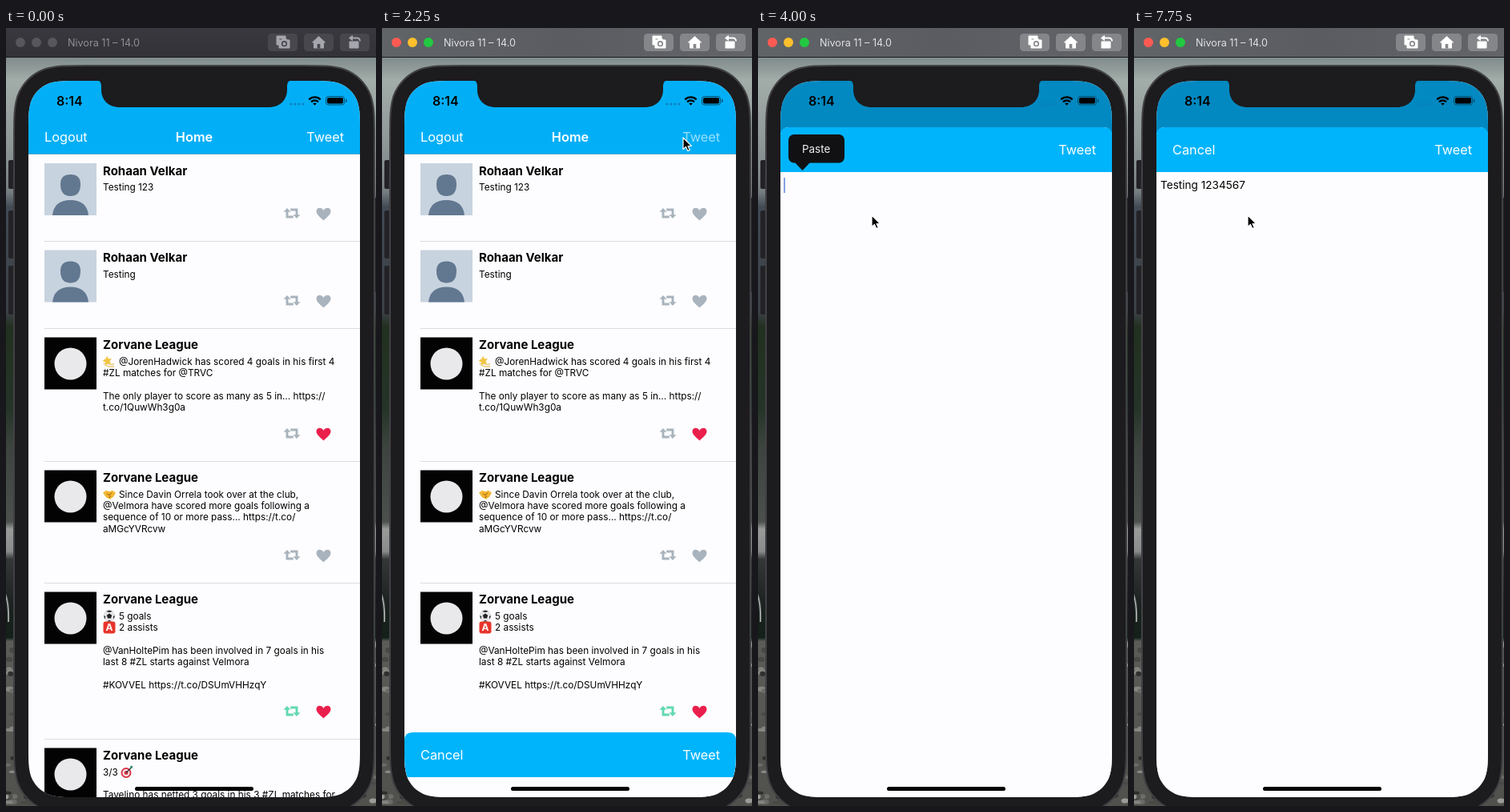
Write an HTML page that moves like this. It is 462 by 972 pixels and loops after 8 s.

```html
<!DOCTYPE html>
<html lang="en">
<head>
<meta charset="utf-8">
<title>Posting from the phone</title>
<style>
html, body { margin: 0; width: 100%; height: 100%; overflow: hidden; background: #1c1b1e; }
svg { display: block; width: 100vw; height: 100vh; font-family: Inter, Roboto, sans-serif; }
.bar { fill: url(#barOff); }
.pill { fill: #48474e; }
.glyph { fill: #a5a5ad; stroke: #a5a5ad; }
.title { fill: #8f8e98; font-size: 12.6px; }
.light { fill: #57565d; }
.on .bar { fill: url(#barOn); }
.on .pill { fill: #85868a; }
.on .glyph { fill: #fff; stroke: #fff; }
.on .title { fill: #dfe0e4; }
.on .red { fill: #ff5a52; }
.on .amber { fill: #ffc02c; }
.on .green { fill: #22c840; }
.hole { fill: #48474e; stroke: none; }
.on .hole { fill: #85868a; }
.nav { font-size: 16.3px; fill: #fff; }
.name { font-size: 15px; font-weight: 700; }
.body { font-size: 11.8px; }
</style>
</head>
<body>
<script>
const LOOP = 8000, STEP = 250;

function seeded(s) {
  return () => (s = (s * 16807) % 2147483647) / 2147483647;
}

const PAPER = '#fdfdff', CASE = '#1c1b1e', IDLE = '#a9b3bd';

const text = (x, y, s, cls, extra = '') => `<text x="${x}" y="${y}" class="${cls}" ${extra}>${s}</text>`;
const box = (x, y, w, h, fill, r = 0) => `<rect x="${x}" y="${y}" width="${w}" height="${h}" rx="${r}" fill="${fill}"/>`;
const dot = (x, y, r, fill) => `<circle cx="${x}" cy="${y}" r="${r}" fill="${fill}"/>`;
const gradient = (id, stops, dir = 'x2="0" y2="1"') => `<linearGradient id="${id}" ${dir}>` +
  stops.map(([o, c]) => `<stop offset="${o}" stop-color="${c}"/>`).join('') + '</linearGradient>';

// rectangle with continuous-curvature corners
function squircle(x, y, w, h, r) {
  const half = [[0, 1.529], [0, 1.089], [0, .868], [.075, .632], [.169, .373]];
  const corner = half.concat(half.slice().reverse().map(([a, b]) => [b, a]));
  const place = (sx, sy, flip) => {
    const p = corner.map(([a, b]) => `${x + (sx ? w - a * r : a * r)} ${y + (sy ? h - b * r : b * r)}`);
    if (flip) p.reverse();
    return `${p[0]}C${p.slice(1).join(' ')}`;
  };
  return `M${place(0, 0)}L${place(1, 0, 1)}L${place(1, 1)}L${place(0, 1, 1)}Z`;
}

// --- desktop behind the phone ---
function stones() {
  const rnd = seeded(41), tones = ['#85857f', '#494a45', '#6b6c68', '#2f302e', '#9a9b98'];
  let s = '';
  for (let i = 0; i < 70; i++) {
    const x = i % 3 ? rnd() * 34 : 440 + rnd() * 22;
    s += `<ellipse cx="${x.toFixed(1)}" cy="${(768 + rnd() * 204).toFixed(1)}" rx="${(3 + rnd() * 4).toFixed(1)}" ry="${(1.5 + rnd() * 2).toFixed(1)}" fill="${tones[i % 5]}"/>`;
  }
  return s;
}

const desktop = box(0, 37, 462, 935, 'url(#wall)') + stones() +
  '<path d="M-4 702Q4 712 3 742" fill="none" stroke="#a0a4a4" stroke-width="2"/>';

const phone =
  [[165, 36], [228, 60], [297, 61]].map(([y, h]) => box(3, y, 8, h, '#232226', 2)).join('') +
  box(458, 212, 4, 118, '#232226') +
  `<path d="${squircle(10, 47, 450, 934, 60)}" fill="${CASE}" stroke="#424145" stroke-width="2"/>`;

// --- window title bar ---
const titleBar = `<rect class="bar" width="462" height="37"/>` + box(0, 36, 462, 1, '#1a1a1c') +
  ['red', 'amber', 'green'].map((c, i) => `<circle class="light ${c}" cx="${18 + 20 * i}" cy="18" r="6"/>`).join('') +
  text(77, 23, 'Nivora 11 – 14.0', 'title') +
  [327, 372, 417].map(x => `<rect class="pill" x="${x}" y="7" width="37" height="22" rx="4.5"/>`).join('') +
  `<g class="glyph" stroke-width="1" stroke-linejoin="round">
    <path d="M338 10h11v3h-8v8h-3z"/><path d="M341 15h3l1.5-2h4l1.5 2h3v10h-13z"/>
    <circle class="hole" cx="347.500" cy="19.700" r="3.600"/><circle cx="347.500" cy="19.700" r="2" stroke="none"/>
    <path d="M382.500 18L390.500 10.500L398.500 18H396.500V25H384.500V18Z"/><rect class="hole" x="388.700" y="20" width="3.600" height="5.500"/>
    <path d="M429 17h11v8h-11z"/><path d="M432 12.500h6q4 0 4 4" fill="none" stroke-width="1.800"/><path d="M432.500 9.500v6l-4-3z"/>
  </g>`;

// --- small pictures ---
const emoji = {
  dizzy: '<path d="M-7 2Q-2 8 6 6M-6-3Q-3 6 6 3" fill="none" stroke="#e9c97c" stroke-width="1.500"/><path d="M-3-7l1.800 3.500 4-.3-2.300 3.300 1.700 3.600-4-.9-2.800 2.700-.5-4-3.500-1.900 3.600-1.800z" fill="#f3c544"/>',
  hands: '<path d="M-8-2L-4-5 0-3.500 4-5 8-2 5 3 1 6-4 3.500z" fill="#f2b632"/><path d="M-3-1L0 1 3-2M-1 4l3-2" fill="none" stroke="#b87714" stroke-width="1.200"/>',
  ball: dot(0, 0, 7.3, '#e4e4e6') + '<path d="M0-3.300L3.200-1 2 2.800H-2L-3.200-1ZM-4-6L0-7.200 4-6 0-4.800ZM7-1L5.500 4 4.800.5ZM-7-1L-5.500 4-4.800.5ZM-3 6.700L0 5 3 6.700Z" fill="#222224"/>',
  letter: box(-7.5, -7.5, 15, 15, '#e8352b', 3) + '<text y="4.300" text-anchor="middle" font-size="12" font-weight="700" fill="#fff">A</text>',
  target: dot(-1, 1, 6.5, '#dc3548') + dot(-1, 1, 4.5, '#f3eef0') + dot(-1, 1, 2.5, '#dc3548') +
    '<path d="M-1 1L5-5" stroke="#333035" stroke-width="1.500"/><path d="M4-4l0-3 3-1 0 3z" fill="#3c8a6c"/>'
};
const heart = 'M0 8C-3 5-9 1-9-3.500C-9-9-2-9 0-4.500C2-9 9-9 9-3.500C9 1 3 5 0 8Z';
const arrow = '<path d="M-10.500-1.800L-6-6.500L-1.500-1.800Z" stroke="none"/><path d="M-6-3V4.500H1.800" fill="none" stroke-width="2.900"/>';
const share = (x, y, c) => `<g transform="translate(${x} ${y})" fill="${c}" stroke="${c}">${arrow}<g transform="rotate(180)">${arrow}</g></g>`;

const person = y => box(48, y, 65, 65, '#c7d3df') +
  `<path d="M68 ${y + 26}q0-12 12.500-12t12.500 12q0 15-12.500 15t-12.500-15zM58 ${y + 65}q2-19 22.500-19t22.500 19z" fill="#627890"/>`;
const badge = y => box(48, y, 65, 65, '#030304') + dot(80.5, y + 33, 20, '#e9e9ec');

// --- feed ---
const LEAGUE = 'Zorvane League', USER = 'Rohaan Velkar';
const posts = [
  { top: 158, end: 266.5, who: USER, lines: ['Testing 123'] },
  { top: 266.5, end: 375.5, who: USER, lines: ['Testing'] },
  { top: 375.5, end: 541.5, who: LEAGUE, liked: 1, lines: [['dizzy', '@JorenHadwick has scored 4 goals in his first 4'],
    '#ZL matches for @TRVC', '', 'The only player to score as many as 5 in… https://', 't.co/1QuwWh3g0a'] },
  { top: 541.5, end: 693.5, who: LEAGUE, lines: [['hands', 'Since Davin Orrela took over at the club,'],
    '@Velmora have scored more goals following a', 'sequence of 10 or more pass… https://t.co/', 'aMGcYVRcvw'] },
  { top: 693.5, end: 888.5, who: LEAGUE, liked: 1, shared: 1, lines: [['ball', '5 goals'], ['letter', '2 assists'], '',
    '@VanHoltePim has been involved in 7 goals in his', 'last 8 #ZL starts against Velmora', '', '#KOVVEL https://t.co/DSUmVHHzqY'] },
  { top: 888.5, end: 1040, who: LEAGUE, lines: ['3/3', '', 'Tavelino has netted 3 goals in his 3 #ZL matches for'] }
];

function post({ top, end, who, lines, liked, shared }) {
  let s = (who === USER ? person : badge)(top + 11) + text(121, top + 25.5, who, 'name');
  lines.forEach((line, i) => {
    const y = top + 45.2 + i * 14.3;
    if (Array.isArray(line)) {
      s += `<g transform="translate(129 ${y - 4})">${emoji[line[0]]}</g>` + text(141, y, line[1], 'body');
    } else s += text(121, y, line, 'body');
  });
  return s + share(357, end - 35, shared ? '#62d9b0' : IDLE) +
    `<path d="${heart}" transform="translate(396.500 ${end - 34})" fill="${liked ? '#ea1f4c' : IDLE}"/>` +
    box(48, end - .5, 394, 1, '#dcdce0');
}

const feed = box(28, 66, 414, 895, PAPER) + posts.map(post).join('') +
  `<g transform="translate(151 929.500)">${emoji.target}</g>` +
  box(28, 66, 414, 92, '#02aff7') + box(28, 157, 414, 1, '#5fa6c8') +
  '<g id="navText">' + text(48, 142, 'Logout', 'nav') +
  text(235, 142, 'Home', 'nav', 'text-anchor="middle" font-weight="600"') +
  text(422, 142, 'Tweet', 'nav', 'text-anchor="end" id="tweet"') + '</g>';

const status = text(63, 96.5, '8:14', '', 'font-size="16" font-weight="600"') +
  [356, 361, 366, 371].map(x => dot(x, 95, 1.5, '#0a80b8')).join('') +
  `<g fill="none" stroke="#000" stroke-width="2.300"><path d="M378.300 89.300A10.500 10.500 0 0 1 392.700 89.300M381 92.300A6.500 6.500 0 0 1 390 92.300"/></g>
  <path d="M383.200 94.200Q385.500 92.600 387.800 94.200L385.500 96.800Z"/>
  <rect x="399.500" y="85.500" width="23" height="10.500" rx="3" fill="none" stroke="#054a6c"/>` +
  box(401, 87, 20, 7.5, '#000', 1.8) + box(424, 89, 1.5, 4, '#054a6c', .7);

// --- compose sheet, drawn with its top edge at 0 ---
const sheet = box(28, 0, 414, 980, PAPER, 10) +
  '<path d="M28 56V10Q28 0 38 0H432Q442 0 442 10V56Z" fill="#00b4fb"/>' +
  text(48, 34, 'Cancel', 'nav') + text(422, 34, 'Tweet', 'nav', 'text-anchor="end"') +
  text(33, 77, '', '', 'id="typed" font-size="13.600"') +
  '<rect id="caret" y="63" width="2" height="19" fill="#3a68d2"/>' +
  `<g id="paste">${box(38, 9, 70, 35.5, '#111114', 7)}<path d="M46 44L55.500 54L65 44Z" fill="#111114"/>` +
  text(55, 32, 'Paste', '', 'font-size="13.400" fill="#f2f2f4"') + '</g>';

document.body.innerHTML = `<svg id="stage" viewBox="0 0 462 972" preserveAspectRatio="none">
<defs>
${gradient('barOff', [[0, '#39383f'], [1, '#333238']])}
${gradient('barOn', [[0, '#606467'], [.5, '#5b5c62'], [1, '#636468']], 'x2="1" y2="0"')}
${gradient('wall', [[0, '#808b8c'], [.03, '#a2aca8'], [.12, '#8d9695'], [.18, '#757c80'], [.2, '#414954'], [.34, '#3a4146'],
  [.36, '#22301f'], [.47, '#253428'], [.52, '#3d443f'], [.62, '#4b504c'], [.63, '#989b99'], [.66, '#888b8a'], [.67, '#343837'],
  [.73, '#1c2220'], [.775, '#122018'], [.78, '#5b5c58'], [1, '#50514d']])}
<clipPath id="screen"><path d="${squircle(28, 66, 414, 895, 41.5)}"/></clipPath>
</defs>
${desktop}${phone}
<g clip-path="url(#screen)">${feed}
<rect id="dim" x="28" y="66" width="414" height="895"/>
${status}<g id="sheet">${sheet}</g>
${box(161, 948, 148, 5, '#000', 2.5)}</g>
<path d="M113 65Q119 66 119 72V77C119 90 128 99 142 99H328C342 99 351 90 351 77V72Q351 66 357 65Z" fill="${CASE}"/>
${titleBar}
<path id="pointer" d="M0 0V14.500L3.400 11.400L5.800 16.600L8.300 15.500L6 10.500H10.500Z" fill="#000" stroke="#fff" stroke-width="1.200" stroke-linejoin="round"/>
</svg>`;

// --- motion ---
const $ = id => document.getElementById(id);
const set = (id, attr, v) => $(id).setAttribute(attr, v);

function track(t, keys) {
  const i = keys.findIndex(k => k[0] > t);
  if (i < 0) return keys[keys.length - 1][1];
  if (i === 0) return keys[0][1];
  const [t0, a] = keys[i - 1], [t1, b] = keys[i];
  return a + (b - a) * (t - t0) / (t1 - t0);
}

const sheetY = [[2000, 972], [2250, 880], [2500, 162], [2750, 124]];
const shade = [[2250, 0], [2500, .22]];
const pointX = [[1500, 453], [1750, 404], [2000, 377], [2250, 376], [2500, 208], [2750, 162], [3000, 142]];
const pointY = [[1500, 74], [1750, 118], [2000, 135], [2250, 137], [2500, 267], [2750, 244], [3000, 234]];
const MESSAGE = 'Testing 1234567';
const keys = [[2500, 0], [4500, 1], [4750, 2], [5000, 3], [5250, 5], [5500, 7], [5750, 9], [6000, 10], [6250, 12], [6750, 14], [7250, 15]];
const blink = [1, 1, .6, 0];

function draw(t) {
  $('stage').classList.toggle('on', t >= 2250);
  set('sheet', 'transform', `translate(0 ${track(t, sheetY)})`);
  set('dim', 'opacity', track(t, shade));
  set('navText', 'opacity', t >= 2500 ? .75 : 1);
  set('tweet', 'opacity', t === 2250 ? .6 : 1);
  set('pointer', 'transform', `translate(${track(t, pointX)} ${track(t, pointY)})`);
  set('pointer', 'opacity', t >= 1500 ? 1 : 0);
  set('paste', 'opacity', t >= 4000 && t < 4500 ? 1 : 0);

  const [when, count] = keys.filter(k => k[0] <= t).pop() || keys[0];
  const typed = $('typed');
  typed.textContent = MESSAGE.slice(0, count);
  set('caret', 'x', 32 + (count ? typed.getComputedTextLength() : 0));
  const beat = Math.max(0, t - Math.min(when, 7000)) / STEP;
  set('caret', 'opacity', blink[beat % 4]);
}

const start = performance.now();
function tick() {
  const t = (performance.now() - start) % LOOP;
  draw(Math.floor(t / STEP) * STEP);
  requestAnimationFrame(tick);
}
tick();
</script>
</body>
</html>
```
